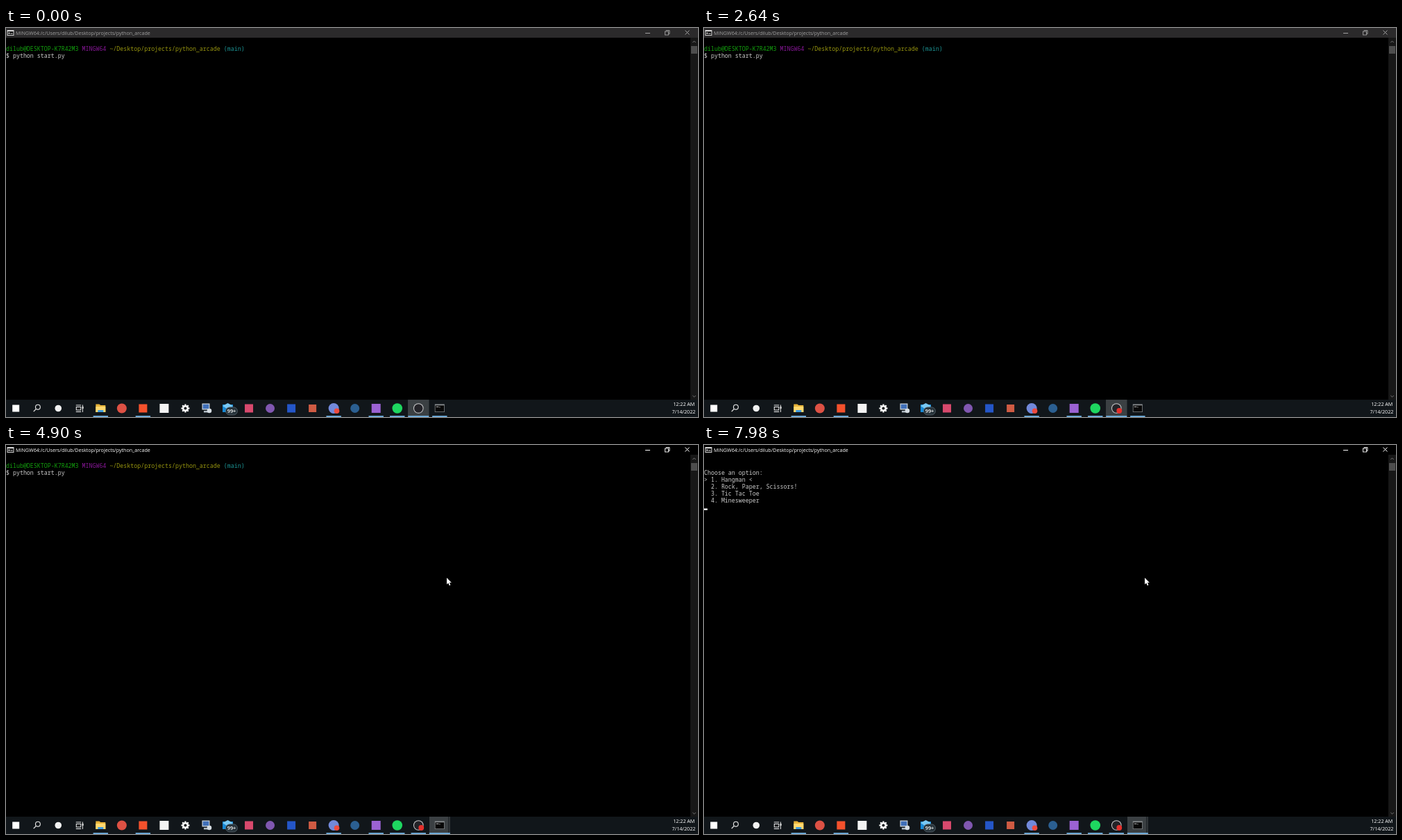
An HTML page with a canvas for the animation above (8 s loop, 997x561 px).

```html
<!DOCTYPE html>
<html lang="en">
<head>
<meta charset="utf-8">
<title>Terminal menu</title>
<style>
  html, body { margin: 0; width: 100%; height: 100%; overflow: hidden; background: #000; }
  canvas { display: block; width: 997px; height: 561px; }
</style>
</head>
<body>
<canvas id="stage" width="997" height="561"></canvas>
<script>
const ctx = document.getElementById('stage').getContext('2d');
const W = 997, H = 561, LOOP = 8000;
const BAR = 536, MID = 548.5, COL = 4.98, ROW = 10;
const RECORD = 480, FOCUS = 4600, ENTER = 6450, MENU = 6900;
const MONO = '8.3px "Noto Sans Mono", monospace';
const UI = '7.15px "Open Sans", sans-serif';

const PROMPT = [
  ['dilub@DESKTOP-K7R42M3', 0, '#13a10e'],
  ['MINGW64', 22, '#881798'],
  ['~/Desktop/projects/python_arcade', 30, '#98960f'],
  ['(main)', 63, '#1c9494']
];
const OPTIONS = [
  'Choose an option:',
  '> 1. Hangman <',
  '  2. Rock, Paper, Scissors!',
  '  3. Tic Tac Toe',
  '  4. Minesweeper'
];
// pointer path: time, x, y
const PATH = [[2860, 997, 6], [3120, 860, 82], [3380, 703, 158], [3620, 639, 188], [4000, 635, 191.5]];

function rect(x, y, w, h, fill) {
  ctx.fillStyle = fill;
  ctx.fillRect(x, y, w, h);
}

function box(x, y, w, h, color, width = 1) {
  ctx.strokeStyle = color;
  ctx.lineWidth = width;
  ctx.strokeRect(x, y, w, h);
}

function disc(x, y, r, fill) {
  ctx.beginPath();
  ctx.arc(x, y, r, 0, Math.PI * 2);
  ctx.fillStyle = fill;
  ctx.fill();
}

function line(points, color, width = 1) {
  ctx.beginPath();
  points.forEach(([x, y]) => ctx.lineTo(x, y));
  ctx.strokeStyle = color;
  ctx.lineWidth = width;
  ctx.stroke();
}

function shape(points, fill) {
  ctx.beginPath();
  points.forEach(([x, y]) => ctx.lineTo(x, y));
  ctx.closePath();
  ctx.fillStyle = fill;
  ctx.fill();
}

function text(str, x, y, color, font, align = 'left') {
  ctx.font = font;
  ctx.textAlign = align;
  ctx.fillStyle = color;
  ctx.fillText(str, x, y);
}

const baseline = row => 22.6 + row * ROW;
const print = (str, col, row, color = '#cccccc') => text(str, col * COL, baseline(row), color, MONO);

function titleBar(active) {
  const ink = active ? '#ffffff' : '#a0a0a0';
  rect(0, 0, W, 14, active ? '#000000' : '#2b2a2b');
  rect(1.5, 3, 10, 8, '#d8d8d8');
  rect(2.5, 5, 8, 5, '#101010');
  rect(3.5, 6.5, 2, 2, '#e0e0e0');
  rect(6.5, 7.5, 3, 1, '#e0e0e0');
  text('MINGW64:/c/Users/dilub/Desktop/projects/python_arcade', 14, 10, ink, UI);
  line([[921, 7.5], [928, 7.5]], ink);
  box(949.5, 5, 5, 5, ink, 0.9);
  line([[951, 4.5], [951, 3.5], [956, 3.5], [956, 8.5], [955, 8.5]], ink, 0.9);
  line([[978.5, 3.5], [984.5, 9.5]], ink);
  line([[984.5, 3.5], [978.5, 9.5]], ink);
}

function scrollBar() {
  rect(986, 14, 11, BAR - 14, '#171717');
  rect(987, 26, 9, 11, '#4d4d4d');
  line([[989.3, 21], [991.5, 18.8], [993.7, 21]], '#777');
  line([[989.3, 530], [991.5, 532.2], [993.7, 530]], '#777');
}

function caret(col, row) {
  rect(col * COL, baseline(row) - 1.1, 5, 2.5, '#f2f2f2');
}

const blinkOn = (t, start) => t >= start && (t - start) % 1060 < 530;

function terminal(t) {
  if (t < MENU) {
    PROMPT.forEach(([str, col, color]) => print(str, col, 1, color));
    print('$ python start.py', 0, 2);
    if (t >= ENTER) {
      if (blinkOn(t, ENTER)) caret(0, 3);
    } else if (blinkOn(t, 4980)) {
      caret(17, 2);
    }
  } else {
    OPTIONS.forEach((str, i) => print(str, 0, i + 2));
    if (blinkOn(t, MENU)) caret(0, 7);
  }
}

const slot = i => 14.2 + i * 30.53;

function square(i, size, color) {
  rect(slot(i) - size / 2, MID - size / 2, size, size, color);
}

function search(x) {
  ctx.beginPath();
  ctx.arc(x + 1.2, MID - 1.8, 3.4, 0, Math.PI * 2);
  ctx.strokeStyle = '#eee';
  ctx.lineWidth = 1.1;
  ctx.stroke();
  line([[x - 1.3, MID + 0.8], [x - 5, MID + 4.6]], '#eee', 1.2);
}

function taskView(x) {
  box(x - 4.5, MID - 2, 6.5, 4.5, '#eee');
  line([[x - 5, MID - 4.5], [x + 2.5, MID - 4.5]], '#eee');
  line([[x - 5, MID + 5], [x + 2.5, MID + 5]], '#eee');
  line([[x + 4.7, MID - 5], [x + 4.7, MID + 5.5]], '#ddd');
  rect(x + 3.8, MID - 2.5, 2, 3, '#eee');
}

function folder(x) {
  shape([[x - 7, 542.5], [x - 2, 542.5], [x, 544], [x + 7, 544], [x + 7, 554], [x - 7, 554]], '#e8b339');
  rect(x - 7, 546, 14, 8, '#ffd96f');
  rect(x - 4, 551, 8, 3, '#3f9de0');
}

function gear(x) {
  for (let k = 0; k < 8; k++) {
    const a = k * Math.PI / 4, c = Math.cos(a), s = Math.sin(a);
    line([[x + c * 3, MID + s * 3], [x + c * 6, MID + s * 6]], '#fff', 2.2);
  }
  disc(x, MID, 4.6, '#fff');
  disc(x, MID, 2, '#11161a');
}

function computer(x) {
  rect(x - 6.5, 541.5, 11, 9, '#c9d3dc');
  rect(x - 5.3, 542.7, 8.6, 6.4, '#3f6fb8');
  rect(x - 4, 552, 8, 2.5, '#aeb8c0');
  disc(x + 4, 552, 3.3, '#d5dce2');
}

function mail(x) {
  rect(x - 7.5, 543, 15, 11, '#1687d4');
  shape([[x - 7.5, 545], [x, 541], [x + 7.5, 545], [x, 550]], '#79c8f3');
  ctx.beginPath();
  ctx.roundRect(x - 3, 546.8, 17, 11.2, 5.6);
  ctx.fillStyle = '#28343b';
  ctx.fill();
  ctx.strokeStyle = '#65737c';
  ctx.lineWidth = 0.6;
  ctx.stroke();
  text('99+', x + 5.5, 555.1, '#fff', '600 7.4px "Open Sans", sans-serif', 'center');
}

function consoleIcon(x) {
  rect(x - 7, 542.5, 14, 11.5, '#8b8f92');
  rect(x - 6.3, 544.3, 12.6, 9, '#080808');
  rect(x - 5, 545.8, 3.5, 1, '#bbb');
  rect(x - 1, 546.5, 2, 0.8, '#999');
}

function taskBar(t) {
  const active = t >= FOCUS ? 20 : 19;
  rect(0, BAR, W, H - BAR, '#11161a');
  if (active === 20) {
    rect(610, BAR, 27, H - BAR, '#3b4043');
    rect(637.5, BAR, 2.5, H - BAR, '#303538');
  } else {
    rect(579, BAR, 30.5, H - BAR, '#3b4043');
  }
  [4, 6, 15, 17, 18, 19, 20].forEach(i => {
    const half = i === active ? 15 : 10.7;
    rect(slot(i) - half, 559.3, half * 2, 1.7, '#76b9ed');
  });

  square(0, 10, '#fff');
  search(slot(1));
  disc(slot(2), MID, 4.8, '#f2f2f2');
  taskView(slot(3));
  folder(slot(4));
  disc(slot(5), MID, 7, '#dd5144');
  square(6, 12, '#f4512c');
  square(7, 13, '#f3f3f3');
  gear(slot(8));
  computer(slot(9));
  mail(slot(10));
  square(11, 12, '#d8496d');
  disc(slot(12), MID, 6.5, '#8057b0');
  square(13, 12, '#2456c8');
  square(14, 11, '#cf5b43');
  disc(slot(15), MID, 7.5, '#7289da');
  disc(slot(15) + 4.4, 552.3, 3.8, '#ef4b3f');
  disc(slot(16), MID, 6.5, '#2b5f91');
  square(17, 13, '#9b62d3');
  disc(slot(18), MID, 7.3, '#1ed760');
  disc(slot(19), MID, 7.3, '#c9c9cb');
  disc(slot(19), MID, 6.3, '#242328');
  if (t >= RECORD) disc(slot(19) + 4, 552, 3.9, '#e5302c');
  consoleIcon(slot(20));

  text('12:22 AM', 992.3, 545.2, '#fff', UI, 'right');
  text('7/14/2022', 993.3, 556.2, '#fff', UI, 'right');
}

function pointer(t) {
  if (t < PATH[0][0]) return;
  let [, x, y] = PATH[PATH.length - 1];
  const next = PATH.findIndex(p => p[0] > t);
  if (next > 0) {
    const a = PATH[next - 1], b = PATH[next];
    const u = (t - a[0]) / (b[0] - a[0]);
    x = a[1] + (b[1] - a[1]) * u;
    y = a[2] + (b[2] - a[2]) * u;
  }
  const arrow = [[0, 0], [0, 9.6], [2.2, 7.6], [3.8, 11.2], [5.4, 10.5], [3.9, 7], [6.9, 7]];
  shape(arrow.map(([dx, dy]) => [x + dx, y + dy]), '#fff');
}

function draw() {
  const t = performance.now() % LOOP;
  rect(0, 0, W, H, '#000');
  terminal(t);
  scrollBar();
  titleBar(t >= FOCUS);
  taskBar(t);
  pointer(t);
  requestAnimationFrame(draw);
}
draw();
</script>
</body>
</html>
```
